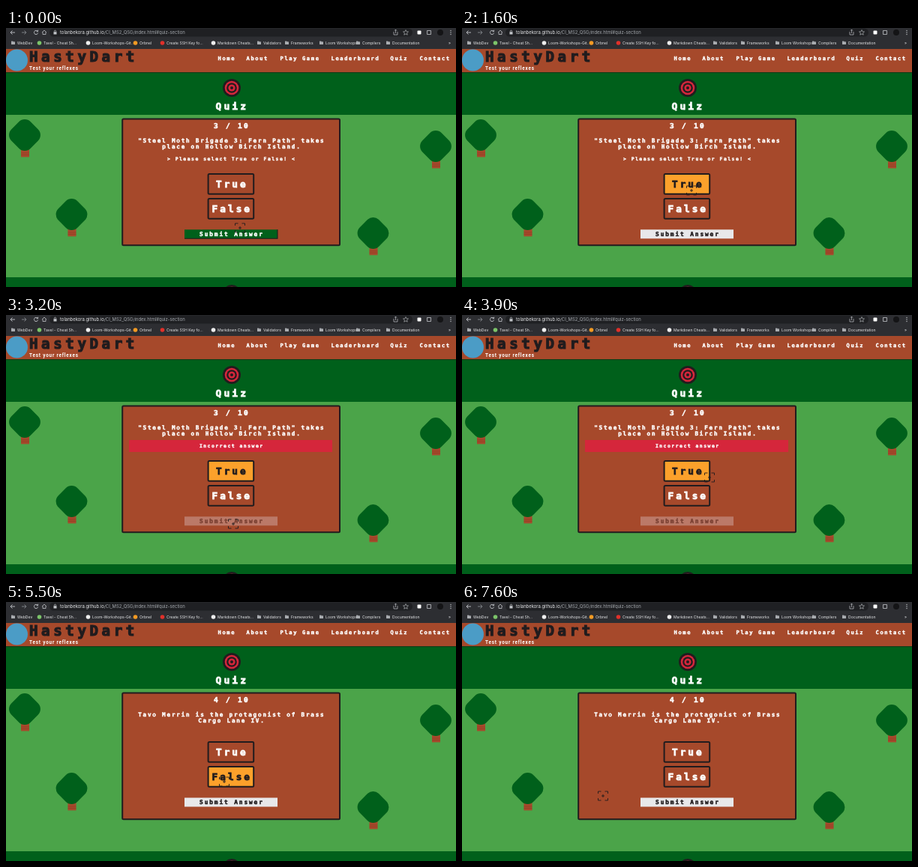
An HTML page for the animation above (8 s loop, 600 by 346 pixels).

```html
<!DOCTYPE html>
<html lang="en">
<head>
<meta charset="utf-8">
<title>Quiz</title>
<style>
  html, body { margin: 0; width: 100%; height: 100%; overflow: hidden; background: #4ba449; }
  svg { display: block; width: 600px; height: 346px; }
  .pixel { font-family: "DejaVu Sans Mono", monospace; font-weight: 700; letter-spacing: .238em; stroke-width: .06em; }
  .ui { font: 5.1px Inter, sans-serif; }
  .url { font-size: 5.9px; }
  .tagline { font: 700 6.4px Roboto, sans-serif; letter-spacing: .8px; }
</style>
</head>
<body>
<svg viewBox="0 0 600 346"><g id="page"></g><g id="quiz"></g></svg>
<script>
const DARK = '#211c1e', BROWN = '#a6492b', GREEN = '#00601b', RED = '#d5263b',
      ORANGE = '#fca12b', WHITE = '#fff', GREY = '#c3c6ca';
const LOOP = 8000, STEP = 100, SUBMITTED = 2700, NEXT = 4500;

const rect = (x, y, w, h, fill, more = '') =>
  `<rect x="${x}" y="${y}" width="${w}" height="${h}" fill="${fill}" ${more}/>`;
const circle = (x, y, r, fill) => `<circle cx="${x}" cy="${y}" r="${r}" fill="${fill}"/>`;
const line = (d, color, w = 1) => `<path d="${d}" fill="none" stroke="${color}" stroke-width="${w}"/>`;
const ui = (s, x, y, more = '') =>
  `<text class="ui ${more}" x="${x}" y="${y}" fill="#e6e7e9">${s}</text>`;

// Heavy monospaced text; advance is the width of one character cell.
const pixel = (s, x, y, advance, fill = WHITE) =>
  `<text class="pixel" x="${x}" y="${y}" font-size="${advance / .84}" fill="${fill}" stroke="${fill}">` +
  s.replace(/</g, '&lt;').replace(/>/g, '&gt;') + '</text>';
const centred = (s, y, advance, fill) =>
  pixel(s, 300.3 - s.length * advance / 2 + advance * .1, y, advance, fill);

const bullseye = (x, y) =>
  [[12, DARK], [9.3, RED], [6.8, DARK], [4.6, RED], [2, DARK]].map(([r, c]) => circle(x, y, r, c)).join('');

const tree = (x, y) =>
  rect(x - 5, y + 16, 11, 13.4, BROWN) +
  line(`M${x - 5} ${y + 24}h11m-11 2.5h11`, '#8c3b22', .6) +
  rect(x - 18, y - 18, 36, 36, GREEN, `rx="11" transform="rotate(45 ${x} ${y})"`);

const folder = x => rect(x, 17.6, 2.4, 2, '#a9acb0') + rect(x, 18.3, 5, 3.7, '#a9acb0', 'rx=".5"');

function browser() {
  const links = [[50, 'Tavel - Cheat Sh...', '#7cc46a'], [115, 'Loom-Workshops-Git...', '#eee'],
    [178, 'Orbnel', '#f59a23'], [214, 'Create SSH Key fo...', '#e0302a'], [282, 'Markdown Cheats...', '#eee']];
  const folders = [[15, 'WebDev'], [343, 'Validators'], [380, 'Frameworks'], [426, 'Loom Workshops'],
    [475, 'Compilers'], [515, 'Documentation']];
  return rect(0, 0, 600, 28, '#2d2e32') +
    rect(58, .5, 484, 11, '#1f2023', 'rx="5.5"') +
    line('M12 6H6m2.5-2.5L6 6l2.5 2.5', GREY, .9) +
    line('M21 6h6m-2.5-2.5L27 6l-2.5 2.5', '#85888d', .9) +
    line('M42 4.2a2.6 2.6 0 1 0 .6 2.4M42.6 2.7v2h-2', GREY, .9) +
    line('M48 6l3-3 3 3M49 5.5v3h4v-3', GREY, .8) +
    rect(63.5, 5.2, 4, 3.3, GREY) + line('M64.4 5.2v-1a1.1 1.1 0 0 1 2.2 0v1', GREY, .7) +
    ui('tolanbekora.github.io<tspan fill="#a4a8ad">/CI_MS2_QSG/index.html#quiz-section</tspan>', 72, 8.2, 'url') +
    line('M517 5v4h5V5m-2.500 2V2m-1.500 1.500L519.500 2l1.500 1.500', GREY, .7) +
    line('M533 2.500l1 2.300 2.500.2-1.900 1.700.6 2.500-2.200-1.300-2.200 1.300.6-2.500-1.900-1.700 2.500-.2z', GREY, .6) +
    rect(548.5, 3.5, 5, 5, WHITE, 'rx="1"') +
    line('M561.5 3.5h5v5h-5z', GREY, .8) + circle(579, 6, 4, '#141416') +
    [3.5, 6, 8.5].map(y => circle(593, y, .7, GREY)).join('') +
    links.map(([x, s, c]) => circle(x - 5.5, 20, 2.8, c) + ui(s, x, 22)).join('') +
    folders.map(([x, s]) => folder(x - 8) + ui(s, x, 22)).join('') +
    ui('»', 590, 22);
}

function page() {
  const nav = [[282, 'Home'], [320, 'About'], [365, 'Play Game'], [433, 'Leaderboard'],
    [512, 'Quiz'], [551, 'Contact']];
  return rect(0, 0, 600, 346, '#4ba449') +
    rect(0, 59, 600, 57, GREEN) + rect(0, 333, 600, 13, GREEN) +
    rect(0, 59, 600, 1.2, '#123d18') +
    rect(0, 27.5, 600, 31.5, BROWN) + browser() +
    circle(14.5, 43, 14.5, '#4b9cc6') +
    pixel('HastyDart', 31, 44.6, 16.1, DARK) +
    '<text class="tagline" x="31" y="56" fill="#fff">Test your reflexes</text>' +
    nav.map(([x, s]) => pixel(s, x + .5, 42.7, 5.9)).join('') +
    bullseye(301, 80) + bullseye(301, 355) +
    centred('Quiz', 109.2, 10.9) +
    tree(25, 143) + tree(87.5, 249) + tree(573, 158) + tree(489.5, 274) +
    rect(155.2, 121.5, 289.8, 168.7, BROWN, `rx="1.5" stroke="${DARK}" stroke-width="2"`);
}

// Pointer path: time, x, y
const path = [[0, 312, 267], [100, 310, 272], [500, 310, 272], [1000, 307, 240], [1400, 306, 217],
  [1700, 306, 217], [2200, 303, 280], [3200, 303, 279], [3600, 322, 236], [3900, 330, 217],
  [4200, 332, 230], [4500, 332, 232], [5000, 310, 241], [5500, 291, 240], [6100, 278, 229],
  [6300, 282, 229], [6500, 300, 204], [6800, 312, 230], [7000, 296, 240], [7600, 188, 259], [8000, 188, 259]];

function pointer(t) {
  const i = path.findIndex(p => p[0] > t), [t0, x0, y0] = path[i - 1], [t1, x1, y1] = path[i];
  const k = (t - t0) / (t1 - t0);
  return [x0 + (x1 - x0) * k, y0 + (y1 - y0) * k];
}

const cursor = (x, y) => `<g transform="translate(${x} ${y})">` +
  line('M-6.5-3v-3h4m5 0h4v3m0 6v3h-4m-5 0h-4v-3M-2 0h4M0-2v4', DARK, .9) + '</g>';

const option = (s, y, lit) =>
  rect(269.6, y, 60.6, 26.7, lit ? ORANGE : BROWN, `rx="1.5" stroke="${DARK}" stroke-width="2"`) +
  centred(s, y + 17.6, 10.7, lit ? DARK : WHITE);

function submit(y, hover, off) {
  const fill = off ? '#bb7968' : hover ? GREEN : '#e8e8ea';
  const ink = off ? '#7b4133' : hover ? WHITE : DARK;
  return rect(238, y, 124, 12, fill) +
    (hover && !off ? line(`M238 ${y + 12}h124v-12`, DARK, 1.1) : '') +
    centred('Submit Answer', y + 8.6, 6.6, ink);
}

function quiz(t) {
  const [x, y] = pointer(t), second = t >= NEXT, done = t >= SUBMITTED && !second;
  const top = second ? 187 : 195, submitY = second ? 261.5 : 269.3;
  const over = (y0, h, x0, w) => x >= x0 && x <= x0 + w && y >= y0 && y <= y0 + h;
  const lines = second
    ? ['Tavo Merrin is the protagonist of Brass', 'Cargo Lane IV.']
    : ['"Steel Moth Brigade 3: Fern Path" takes', 'place on Hollow Birch Island.'];
  const picked = t >= 1400 && !second;
  return centred(second ? '4 / 10' : '3 / 10', 133.8, 8) +
    centred(lines[0], 153.4, 6.4) + centred(lines[1], 160.8, 6.4) +
    (done ? rect(164, 167, 271, 16, RED) + centred('Incorrect answer', 177, 5.37) : '') +
    (done || second ? '' : centred('> Please select True or False! <', 177, 5.37)) +
    option('True', top, picked || !done && over(top, 27, 269, 61)) +
    option('False', top + 33, !picked && over(top + 33, 27, 269, 61)) +
    submit(submitY, over(submitY - 4, 16, 238, 124), done) +
    cursor(x, y);
}

const get = id => document.getElementById(id);
get('page').innerHTML = page();
let shown = -1;
function draw(now) {
  const t = Math.floor(now % LOOP / STEP) * STEP;
  if (t !== shown) get('quiz').innerHTML = quiz(shown = t);
  requestAnimationFrame(draw);
}
draw(performance.now());
</script>
</body>
</html>
```
